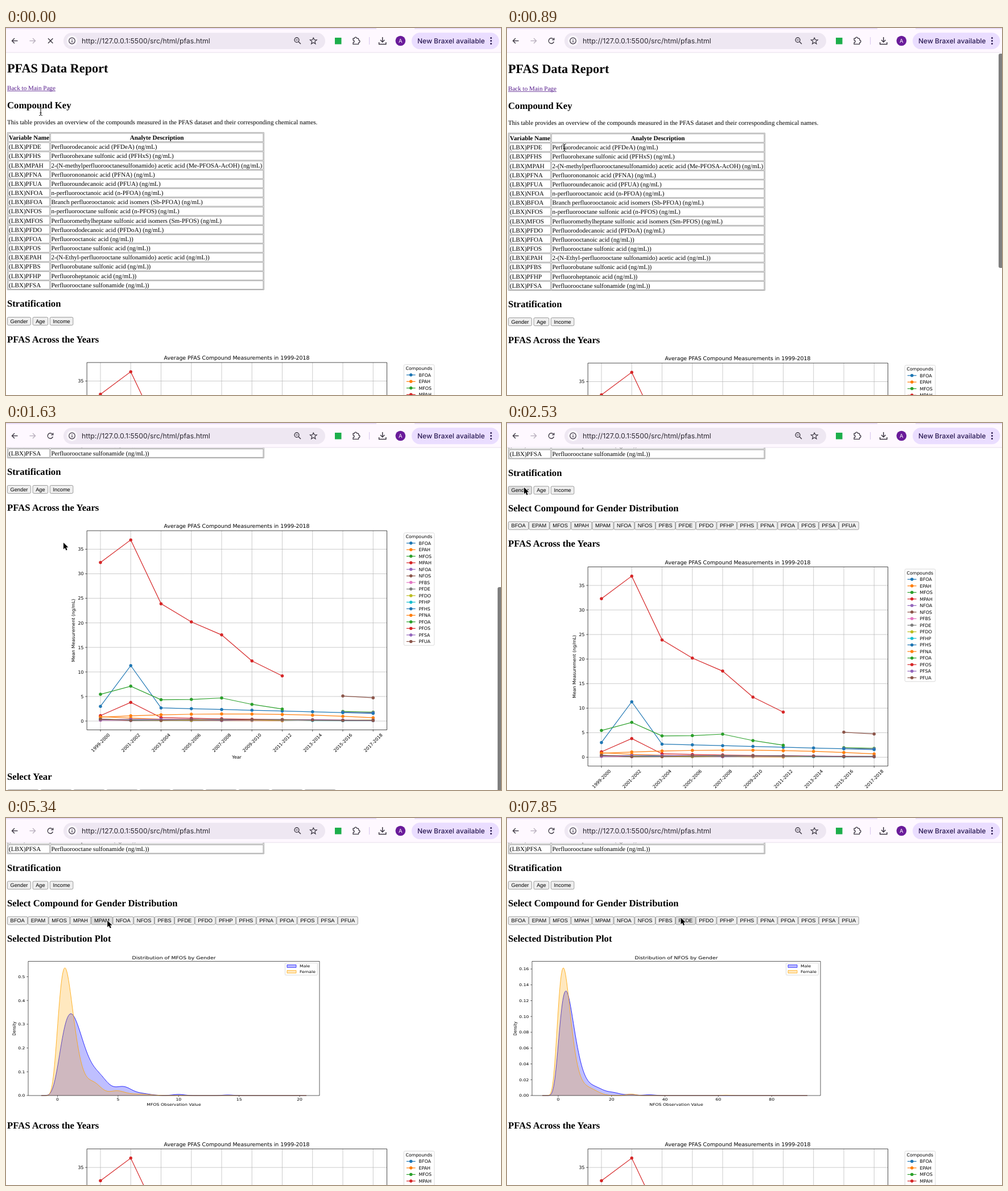
Animation, 870 px wide and 644 px high, one loop 8000 ms. Source, as an HTML page with a canvas:

```html
<!DOCTYPE html>
<html lang="en">
<head>
<meta charset="utf-8">
<title>PFAS Data Report</title>
<style>
html, body { margin: 0; width: 100%; height: 100%; overflow: hidden; background: #fff; }
canvas { display: block; width: 870px; height: 644px; }
</style>
</head>
<body>
<canvas id="stage"></canvas>
<script>
const W = 870, H = 644, LOOP = 8000, STEP = 148, LAST = 53;
const canvas = document.getElementById('stage');
const ctx = canvas.getContext('2d');
const dpr = window.devicePixelRatio || 1;
canvas.width = W * dpr;
canvas.height = H * dpr;

const SERIF = '"Liberation Serif", Times, serif';
const ARIAL = '"Liberation Sans", Arial, sans-serif';
const PLOT = '"DejaVu Sans", sans-serif';
const UI = 'Inter, Roboto, sans-serif';
const TAB10 = ['#1f77b4', '#ff7f0e', '#2ca02c', '#d62728', '#9467bd',
  '#8c564b', '#e377c2', '#7f7f7f', '#bcbd22', '#17becf'];

// y is the middle of the capital letters
function text(s, x, y, size, font, o = {}) {
  ctx.font = `${o.weight || 400} ${size}px ${font}`;
  ctx.textAlign = o.align || 'left';
  ctx.fillStyle = o.color || '#000';
  ctx.fillText(s, x, y + size * (font === SERIF ? 0.33 : 0.36));
}

function line(color, width, ...pts) {
  ctx.strokeStyle = color;
  ctx.lineWidth = width;
  ctx.beginPath();
  for (let i = 0; i < pts.length; i += 2) ctx.lineTo(pts[i], pts[i + 1]);
  ctx.stroke();
}

function rect(x, y, w, h, fill, stroke, r = 0, lw = 0.7) {
  ctx.beginPath();
  ctx.roundRect(x, y, w, h, r);
  if (fill) { ctx.fillStyle = fill; ctx.fill(); }
  if (stroke) { ctx.strokeStyle = stroke; ctx.lineWidth = lw; ctx.stroke(); }
}

function dot(x, y, r, color) {
  ctx.fillStyle = color;
  ctx.beginPath();
  ctx.arc(x, y, r, 0, 7);
  ctx.fill();
}

function ring(x, y, r, color, lw, from = 0, to = 2 * Math.PI) {
  ctx.strokeStyle = color;
  ctx.lineWidth = lw;
  ctx.beginPath();
  ctx.arc(x, y, r, from, to);
  ctx.stroke();
}

function at(x, y, draw) {
  ctx.save();
  ctx.translate(x, y);
  draw();
  ctx.restore();
}

// ---- timeline, counted in steps ----
const LOADED = 4, OPENED = 16;
const START = [61, 147];
// pointer moves: [from, to, x, y], resting in between
const MOVES = [
  [0, 2, 101, 210], [11, 17, 30, 113], [18, 22, 18, 177], [22, 26, 53.5, 184],
  [27, 32, 116, 178], [33, 38, 212, 181], [39, 43, 243, 179], [44, 49, 79, 140],
  [49, 52, 343, 203], [52, 53, 305.5, 175]
];

const ease = u => u * u * (3 - 2 * u);
const clamp = u => Math.max(0, Math.min(1, u));
const progress = (k, from, to) => ease(clamp((k - from) / (to - from)));

function pointer(k) {
  let [x, y] = START;
  for (const [from, to, nx, ny] of MOVES) {
    const u = progress(k, from, to);
    x += (nx - x) * u;
    y += (ny - y) * u;
  }
  return [x, y];
}

function scrollAt(k) {
  if (k < LOADED) return 1;
  return k < OPENED ? 399 * progress(k, 6, 11) : 397.5;
}

function plotAt(k) {
  return k < 23 ? null : k < 30 ? 'BFOA' : k < 43 ? 'MFOS' : 'NFOS';
}

// ---- page ----
const COMPOUNDS = [
  ['PFDE', 'Perfluorodecanoic acid (PFDeA) (ng/mL)'],
  ['PFHS', 'Perfluorohexane sulfonic acid (PFHxS) (ng/mL)'],
  ['MPAH', '2-(N-methylperfluorooctanesulfonamido) acetic acid (Me-PFOSA-AcOH) (ng/mL)'],
  ['PFNA', 'Perfluorononanoic acid (PFNA) (ng/mL)'],
  ['PFUA', 'Perfluoroundecanoic acid (PFUA) (ng/mL)'],
  ['NFOA', 'n-perfluorooctanoic acid (n-PFOA) (ng/mL)'],
  ['BFOA', 'Branch perfluorooctanoic acid isomers (Sb-PFOA) (ng/mL)'],
  ['NFOS', 'n-perfluorooctane sulfonic acid (n-PFOS) (ng/mL)'],
  ['MFOS', 'Perfluoromethylheptane sulfonic acid isomers (Sm-PFOS) (ng/mL)'],
  ['PFDO', 'Perfluorododecanoic acid (PFDoA) (ng/mL)'],
  ['PFOA', 'Perfluorooctanoic acid (ng/mL))'],
  ['PFOS', 'Perfluorooctane sulfonic acid (ng/mL))'],
  ['EPAH', '2-(N-Ethyl-perfluorooctane sulfonamido) acetic acid (ng/mL))'],
  ['PFBS', 'Perfluorobutane sulfonic acid (ng/mL))'],
  ['PFHP', 'Perfluoroheptanoic acid (ng/mL))'],
  ['PFSA', 'Perfluorooctane sulfonamide (ng/mL))']
];
const CHOICES = 'BFOA EPAM MFOS MPAH MPAM NFOA NFOS PFBS PFDE PFDO PFHP PFHS PFNA PFOA PFOS PFSA PFUA'.split(' ');
const BASE = 11.12;

const h2 = (s, y) => text(s, 2, y, BASE * 1.5, SERIF, { weight: 700 });

function buttons(labels, y, gap, mouse, fixed) {
  let x = 2;
  for (const s of labels) {
    ctx.font = `9.25px ${ARIAL}`;
    const w = fixed || ctx.measureText(s).width + 11;
    const over = mouse && mouse[0] > x && mouse[0] < x + w && Math.abs(mouse[1] - y) < 7.2;
    rect(x + 0.4, y - 7, w - 0.8, 14, over ? '#dedede' : '#efefef', '#767676', 2);
    text(s, x + w / 2, y - 0.2, 9.25, ARIAL, { align: 'center' });
    x += w + gap;
  }
}

function table() {
  rect(2.4, 184.3, 451, 276.1, null, '#808080');
  for (let i = 0; i <= COMPOUNDS.length; i++) {
    const y = 185.9 + 16.17 * i, mid = y + 7.5;
    rect(4.1, y, 72.6, 14.7, null, '#808080');
    rect(78.3, y, 373.6, 14.7, null, '#808080');
    if (i) {
      const [name, info] = COMPOUNDS[i - 1];
      text('(LBX)' + name, 5, mid, BASE, SERIF);
      text(info, 79.4, mid, BASE, SERIF);
    } else {
      text('Variable Name', 40.5, mid, BASE, SERIF, { weight: 700, align: 'center' });
      text('Analyte Description', 265, mid, BASE, SERIF, { weight: 700, align: 'center' });
    }
  }
}

// ---- yearly chart ----
const YEARS = Array.from({ length: 10 }, (_, i) => `${1999 + 2 * i}-${2000 + 2 * i}`);
const NAMES = 'BFOA EPAH MFOS MPAH NFOA NFOS PFBS PFDE PFDO PFHP PFHS PFNA PFOA PFOS PFSA PFUA'.split(' ');
const falling = (...values) => i => values[i];
const TRENDS = {
  PFOS: falling(32.3, 36.9, 23.9, 20.2, 17.55, 12.25, 9.2),
  PFOA: falling(5.45, 7.1, 4.35, 4.4, 4.7, 3.4, 2.45),
  PFHS: i => i === 1 ? 11.3 : 3 - 0.16 * i,
  MPAH: i => i === 1 ? 3.8 : 1.1 * 0.8 ** i,
  PFNA: i => 1.45 - 0.035 * (i - 4.3) ** 2,
  EPAH: i => i < 7 ? 0.9 * 0.65 ** i : undefined
};
// measured in the last two periods only
const LATE = { BFOA: 0.1, MFOS: 1.95, NFOA: 1.8, NFOS: 5.1 };

const noise = n => { const v = Math.sin(n * 12.9898) * 43758.5453; return v - Math.floor(v); };

function measured(name, n, i) {
  if (TRENDS[name]) return TRENDS[name](i);
  if (LATE[name]) return i < 8 ? undefined : LATE[name] * (1 - 0.07 * (i - 8));
  return 0.1 + 0.35 * noise(n * 10 + i) * (1 - i / 15);
}

function yearChart() {
  const px = i => 166 + 53.25 * i, py = v => 523 - 8.614 * v;
  const mid = { align: 'center' };
  text('Average PFAS Compound Measurements in 1999-2018', 405.5, 181, 9.4, PLOT, mid);
  YEARS.forEach((label, i) => {
    const x = px(i);
    line('#b0b0b0', 0.65, x, 189, x, 538.5);
    line('#000', 0.65, x, 538.5, x, 541.5);
    at(x, 561, () => {
      ctx.rotate(-Math.PI / 4);
      text(label, 0, 0, 7.83, PLOT, mid);
    });
  });
  for (let v = 0; v <= 35; v += 5) {
    const y = py(v);
    line('#b0b0b0', 0.65, 142.2, y, 669.5, y);
    line('#000', 0.65, 139.2, y, 142.2, y);
    text(String(v), 136.5, y, 7.83, PLOT, { align: 'right' });
  }
  rect(699.3, 192.8, 53.5, 197.4, '#fff', '#ccc', 2);
  text('Compounds', 725.8, 199.3, 7.83, PLOT, mid);
  NAMES.forEach((name, n) => {
    const color = TAB10[n % 10], y = 210.8 + 11.51 * n;
    const pts = YEARS.map((_, i) => [px(i), py(measured(name, n, i))]).filter(p => !isNaN(p[1]));
    line(color, 1.2, ...pts.flat());
    for (const p of pts) dot(...p, 2.75, color);
    line(color, 1.2, 703.8, y, 719.6, y);
    dot(711.7, y, 2.75, color);
    text(name, 725.6, y, 7.83, PLOT);
  });
  rect(142.2, 189, 527.3, 349.5, null, '#000', 0, 0.7);
  text('Year', 405.5, 586, 7.83, PLOT, mid);
  at(118.5, 364, () => {
    ctx.rotate(-Math.PI / 2);
    text('Mean Measurement (ng/mL)', 0, 0, 7.83, PLOT, mid);
  });
}

// ---- density plots, in pixels ----
const bell = u => Math.exp(-u * u / 2);

// Log-normal hump around peak, plus small bumps [x, height, width]
function hump(origin, peak, height, spread, ...bumps) {
  return x => {
    const main = x > origin ? height * bell(Math.log((x - origin) / (peak - origin)) / spread) : 0;
    return bumps.reduce((sum, [bx, h, w]) => sum + h * bell((x - bx) / w), main);
  };
}

// x and y axes: first tick, tick gap, value gap, decimals, tick range
const DENSITY = {
  BFOA: {
    left: 37, x: [36.2, 66.8, 0.1, 1, 1, 7], y: [487, -33.6, 5, 0, 0, 6],
    male: hump(0, 83.5, 223, 0.093, [110, 9, 6], [170, 14, 7.5], [237, 2, 7], [304, 0.8, 7]),
    female: hump(0, 83, 214, 0.098, [110, 8, 6], [170, 11.5, 7.5], [237, 1, 8], [438, 0.7, 7])
  },
  MFOS: {
    left: 39, x: [90.5, 106.4, 5, 0, 0, 4], y: [487, -41.7, 0.1, 1, 0, 5],
    male: hump(50, 114, 143.5, 0.316, [167, 13, 13], [207, 13, 14], [240, 3, 14], [303, 2, 10], [390, 1, 9]),
    female: hump(55, 103.5, 224, 0.279, [156, 16, 12], [195, 8, 14], [235, 2.5, 18])
  },
  NFOS: {
    left: 44, x: [90, 93.8, 20, 0, 0, 4], y: [487, -27.75, 0.02, 2, 0, 8],
    male: hump(60, 103.5, 183.5, 0.309, [158, 9, 13], [187, 4.5, 12], [218, 1.8, 8], [250, 1.3, 10]),
    female: hump(58, 99, 224, 0.277, [147, 9, 14], [218, 2.5, 8], [385, 0.6, 8])
  }
};

function curve(height, base, rgb) {
  ctx.beginPath();
  for (let x = 62; x <= 528; x++) ctx.lineTo(x, base - height(x));
  ctx.fillStyle = `rgba(${rgb},.25)`;
  ctx.fill();
  ctx.strokeStyle = `rgba(${rgb},.8)`;
  ctx.lineWidth = 1;
  ctx.stroke();
}

function ticks([first, gap, unit, places, from, to], draw) {
  for (let i = from; i <= to; i++) draw(first + gap * i, (unit * i).toFixed(places));
}

function densityPlot(name) {
  const { left, x, y, male, female } = DENSITY[name];
  const right = 551, top = 251.5, base = 487, centre = (left + right) / 2;
  const BLUE = '0,0,255', ORANGE = '255,165,0';
  // the figure is shown flatter than it was made
  const label = (s, lx, ly, size, align = 'center', turn = 0) => at(lx, ly, () => {
    ctx.scale(1, 0.8325);
    ctx.rotate(turn);
    text(s, 0, 0, size, PLOT, { align });
  });
  label(`Distribution of ${name} by Gender`, centre, 244.8, 9.29);
  ticks(x, (tx, s) => {
    line('#000', 0.6, tx, base, tx, base + 2.4);
    label(s, tx, 493.6, 7.74);
  });
  ticks(y, (ty, s) => {
    line('#000', 0.6, left - 2.7, ty, left, ty);
    label(s, left - 5.5, ty, 7.74, 'right');
  });
  curve(male, base, BLUE);
  curve(female, base, ORANGE);
  rect(left, top, right - left, base - top, null, '#000', 0, 0.65);
  label(`${name} Observation Value`, centre, 503, 7.74);
  label('Density', 14.5, 369.5, 7.74, 'center', -Math.PI / 2);
  rect(490.5, 254.3, 56.8, 21.4, 'rgba(255,255,255,.8)', '#ccc', 1.5);
  [['Male', BLUE], ['Female', ORANGE]].forEach(([s, rgb], i) => {
    const ly = 260 + 9.8 * i;
    rect(494, ly - 2.3, 16, 4.6, `rgba(${rgb},.25)`, `rgba(${rgb},.8)`, 0, 0.9);
    label(s, 516, ly, 7.74, 'left');
  });
}

function page(k, mouse) {
  const scroll = scrollAt(k), plot = plotAt(k);
  const local = [mouse[0], mouse[1] + scroll];
  ctx.save();
  ctx.beginPath();
  ctx.rect(0, 43, W, H - 43);
  ctx.clip();
  ctx.translate(0, -scroll);
  text('PFAS Data Report', 2, 72, BASE * 2, SERIF, { weight: 700 });
  text('Back to Main Page', 2, 106.5, BASE, SERIF, { color: '#551a8b' });
  line('#551a8b', 0.8, 2, 111.6, 87, 111.6);
  h2('Compound Key', 136);
  text('This table provides an overview of the compounds measured in the PFAS dataset and their corresponding chemical names.',
    2, 166.3, BASE, SERIF);
  table();
  h2('Stratification', 484.8);
  buttons(['Gender', 'Age', 'Income'], 515.5, 2.8, local);
  let shift = 0;
  if (k >= OPENED) {
    h2('Select Compound for Gender Distribution', 547);
    buttons(CHOICES, 577.6, 0, local);
    shift = 62;
  }
  if (plot) {
    h2('Selected Distribution Plot', 609);
    at(0, 397.5, () => densityPlot(plot));
    shift += 328.2;
  }
  ctx.translate(0, shift);
  h2('PFAS Across the Years', 547);
  at(0, 399, yearChart);
  h2('Select Year', 1019);
  buttons(YEARS, 1049.6, 2, null, 56);
  ctx.restore();
  if (k >= LOADED && k < OPENED) rect(864, 45 + scroll * 0.609, 8, 376, '#7f7f7f', null, 3);
}

// ---- browser bar ----
function arrowIcon(x, dir, color) {
  line(color, 1.4, x - 5 * dir, 22.5, x + 5 * dir, 22.5);
  line(color, 1.4, x + 0.5 * dir, 18, x + 5 * dir, 22.5, x + 0.5 * dir, 27);
}

function starIcon(x, y, color) {
  const pts = [];
  for (let i = 0; i <= 10; i++) {
    const r = i % 2 ? 2.7 : 6.2, a = i * Math.PI / 5 - Math.PI / 2;
    pts.push(x + r * Math.cos(a), y + r * Math.sin(a));
  }
  line(color, 1.2, ...pts);
}

function puzzleIcon(x, y, color) {
  const q = Math.PI / 2;
  at(x, y, () => {
    ctx.beginPath();
    ctx.moveTo(-5, -4);
    ctx.arc(-0.5, -4.5, 1.9, Math.PI, 0);
    ctx.lineTo(4.5, -4);
    ctx.arc(5, 0.9, 1.9, -q, q);
    ctx.lineTo(4.5, 5.9);
    ctx.lineTo(-5, 5.9);
    ctx.arc(-4.8, 0.9, 1.9, q, -q, true);
    ctx.closePath();
    ctx.strokeStyle = color;
    ctx.lineWidth = 1.3;
    ctx.stroke();
  });
}

function bar(loading) {
  const ink = '#3c3742', deep = '#2a1a52';
  rect(0, 0, W, 43, '#fef8ff');
  rect(0, 0, W, 2, '#e9dcf7');
  rect(651, 0, 67, 2, '#fef8ff');
  rect(0, 42.5, W, 1, '#e8e0eb');
  arrowIcon(15.5, -1, ink);
  arrowIcon(46.5, 1, '#b8afbd');
  if (loading) {
    line(ink, 1.4, 74, 18.3, 82.4, 26.7);
    line(ink, 1.4, 82.4, 18.3, 74, 26.7);
  } else {
    ring(78, 22.5, 4.7, ink, 1.4, 0.35, 5.6);
    line(ink, 1.4, 82.7, 17.4, 82.7, 20.9, 79.2, 20.9);
  }
  rect(101, 8.5, 460, 28.5, '#eee7f2', null, 14.2);
  dot(116, 22.5, 9.5, '#fbf6fd');
  ring(116, 22.5, 5.3, ink, 1.2);
  rect(115.4, 21.8, 1.3, 3.6, ink);
  rect(115.4, 19.4, 1.3, 1.3, ink);
  text('http://127.0.0.1:5500/src/html/pfas.html', 133, 22.6, 12.3, UI, { color: '#2b2730' });
  ring(511, 21, 4, ink, 1.3);
  line(ink, 1.4, 514, 24, 518, 28);
  line(ink, 1.1, 509, 21, 513, 21);
  starIcon(540.3, 22.8, ink);
  rect(578, 17, 11.5, 11.5, '#1cae4b');
  puzzleIcon(615, 22.5, ink);
  rect(638, 16, 1.2, 13, '#dccdf0');
  line(ink, 1.5, 661.7, 16, 661.7, 24.5);
  line(ink, 1.5, 658, 21, 661.7, 24.7, 665.4, 21);
  line(ink, 1.5, 655.6, 25, 655.6, 28.6, 667.8, 28.6, 667.8, 25);
  dot(693.3, 22.5, 8.8, '#6a1b9a');
  text('A', 693.3, 22.6, 9.5, UI, { color: '#fff', align: 'center' });
  rect(713, 8.3, 153.5, 29, '#eaddff', null, 14.5);
  text('New Braxel available', 723, 22.7, 12, UI, { color: deep, weight: 500 });
  for (const y of [17.5, 22.5, 27.5]) dot(852.5, y, 1.5, deep);
}

function textCursor() {
  for (const [color, w] of [['#fff', 2.2], ['#000', 1]]) {
    line(color, w, 0, -5.5, 0, 5.5);
    for (const d of [-1, 1]) line(color, w, -2.8, 6.6 * d, -1.6, 6.4 * d, 0, 5.3 * d, 1.6, 6.4 * d, 2.8, 6.6 * d);
  }
  line('#000', 1, -1.6, 2, 1.6, 2);
}

function arrowCursor() {
  ctx.beginPath();
  for (const p of [[0, 0], [0, 11.6], [2.7, 9.1], [4.6, 13.4], [6.6, 12.5], [4.8, 8.3], [8.4, 8.3]]) ctx.lineTo(...p);
  ctx.closePath();
  ctx.strokeStyle = '#fff';
  ctx.lineWidth = 1.6;
  ctx.stroke();
  ctx.fillStyle = '#000';
  ctx.fill();
}

function draw(now) {
  const k = Math.min(LAST, Math.floor((now % LOOP) / STEP));
  const mouse = pointer(k);
  ctx.setTransform(dpr, 0, 0, dpr, 0, 0);
  ctx.textRendering = 'geometricPrecision';
  ctx.fillStyle = '#fff';
  ctx.fillRect(0, 0, W, H);
  page(k, mouse);
  bar(k < LOADED);
  at(...mouse, k < 7 ? textCursor : arrowCursor);
}

let start = null;
function tick() {
  const now = performance.now();
  if (start === null) start = now;
  draw(now - start);
  requestAnimationFrame(tick);
}
tick();
</script>
</body>
</html>
```
